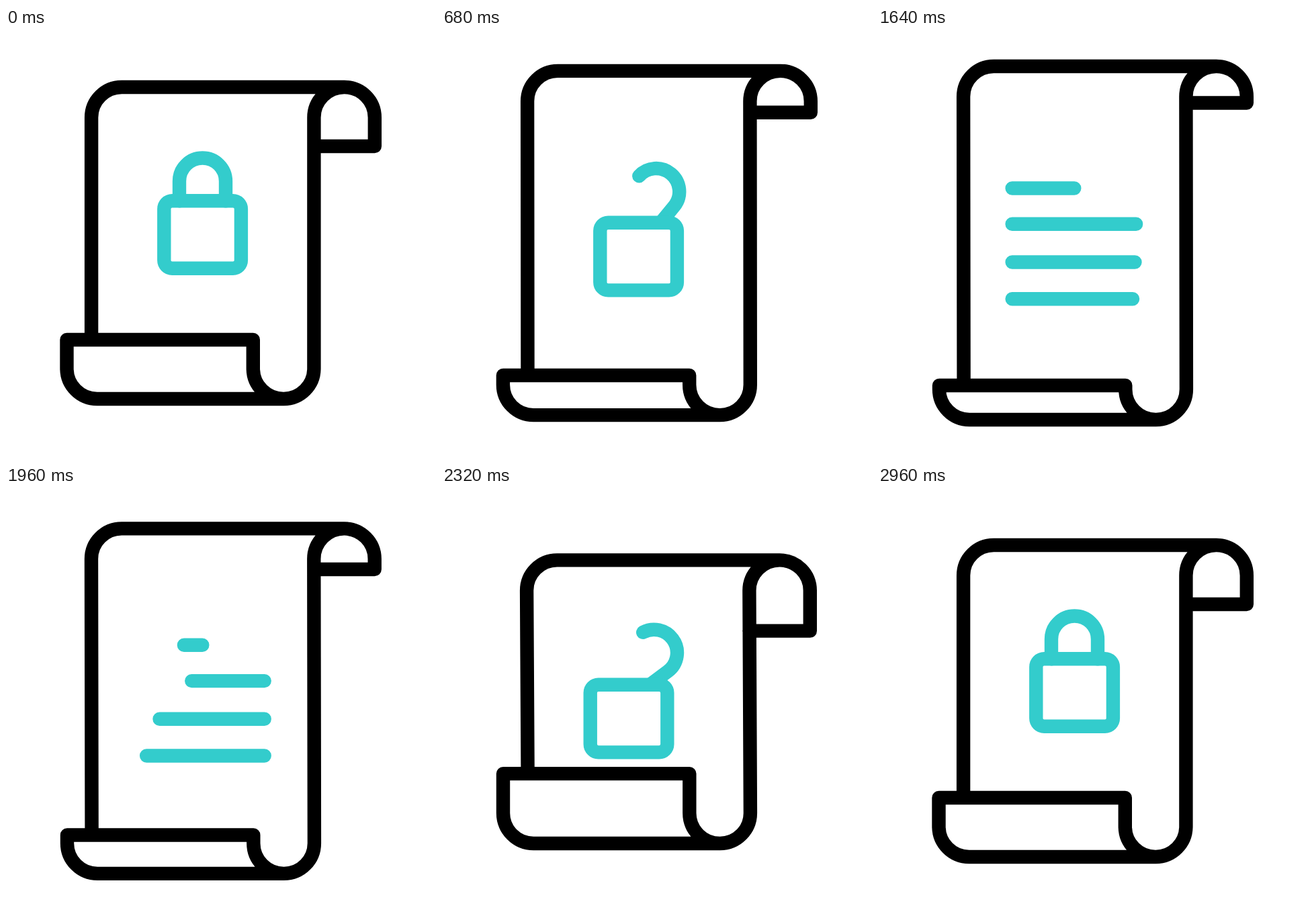
Recreate the animation shown at these times as an HTML page. Size 640 by 640 pixels, loop 3000 ms.

```html
<!DOCTYPE html>
<html lang="en">
<head>
<meta charset="utf-8">
<title>Unlocking scroll</title>
<style>
  html, body { margin: 0; width: 100%; height: 100%; overflow: hidden; background: #fff; }
  svg { display: block; width: 100vw; height: 100vh; }
  path, rect { fill: none; stroke-width: 20.4; stroke-linecap: round; stroke-linejoin: round; }
</style>
</head>
<body>
<svg viewBox="0 0 640 640">
  <defs>
    <clipPath id="paper"><rect x="127" y="0" width="331.5" height="640"/></clipPath>
  </defs>
  <g stroke="#33cccc" clip-path="url(#paper)">
    <g id="lock">
      <path id="shackle" d="M327 257.2V228A34.5 34.5 0 0 0 258 228V257.2"/>
      <rect x="235.3" y="257.2" width="114.6" height="100.6" rx="12"/>
    </g>
    <path id="text"/>
  </g>
  <path id="scroll" stroke="#000"/>
</svg>
<script>
const LOOP = 3000, STEP = 40, R = 45.2;
const SHACKLE = 2 * 29.2 + Math.PI * 34.5;
const SLIDE = 240;
const el = id => document.getElementById(id);
const span = (t, from, to) => Math.max(0, Math.min(1, (t - from) / (to - from)));
const easeOut = p => 1 - (1 - p) ** 3;

// Smooth 0 to 1 between two times
function ramp(t, from, to) {
  const p = span(t, from, to);
  return p * p * (3 - 2 * p);
}

// The sheet unrolls, rolls up past its resting size, then settles
function drawScroll(t) {
  const rollUp = ramp(t, 1840, 2420);
  const open = ramp(t, 200, 890) - rollUp;
  const tight = rollUp - ramp(t, 2420, 2970);

  const top = 88 - 31 * open + 27 * tight;
  const bottom = 552 + 31 * open - 24.3 * tight;
  const flap = top + 88 - 33.5 * open + 21.6 * tight;
  const edge = bottom - 88 + 37 * open - 20.5 * tight;
  const a = -1.1 * tight, b = 0.5 * (open + tight);
  const upper = top + R, lower = bottom - R;
  const arc = (sweep, x, y) => `A${R} ${R} 0 0 ${sweep} ${x} ${y}`;

  el('scroll').setAttribute('d',
    `M${127.1 + b} ${edge}L${127.1 + a} ${upper}` + arc(1, 172.3 + a, top) +
    `H${503.6 + a}` + arc(1, 548.8 + a, upper) + `V${flap}H${458.4 + a}` +
    `M${503.6 + a} ${top}` + arc(0, 458.4 + a, upper) +
    `L${458.4 + b} ${lower}` + arc(1, 413.2 + b, bottom) +
    `H${135.7 + b}` + arc(1, 90.5 + b, lower) + `V${edge}H${367.8 + b}V${lower}` +
    arc(0, 413.2 + b, bottom));
}

// The lock leaves on the right and comes back from the left
function drawLock(t, drop) {
  const x = t < LOOP / 2
    ? SLIDE * ramp(t, 1055, 1455)
    : SLIDE * (ramp(t, 1980, 2380) - 1);
  const angle = 42 * ramp(t, 240, 760) - 28 * ramp(t, 960, 1220)
    + 40 * ramp(t, 1980, 2280) - 54 * ramp(t, 2280, 2900);
  const trim = 35 * (ramp(t, 240, 790) - ramp(t, 2280, 2920));
  el('lock').setAttribute('transform', `translate(${x} ${drop})`);
  el('shackle').setAttribute('transform', `rotate(${angle} 329.5 256.2)`);
  el('shackle').setAttribute('stroke-dasharray', `${SHACKLE - trim + 0.1} 999`);
}

// Rows are drawn from the left, then wiped from the left, one after another
const rowY = [238.5, 291.8, 348.5, 403.2];
const wipeStart = [1704, 1783, 1860, 1905];

function drawText(t, shift) {
  const left = 199.6;
  el('text').setAttribute('d', rowY.map((y, i) => {
    const width = i ? 185.1 : 92.7;
    const drawStart = 1190 + 40 * i;
    const head = easeOut(span(t, drawStart, drawStart + 480));
    const tail = ramp(t, wipeStart[i], wipeStart[i] + 400);
    return head > tail
      ? `M${left + width * tail} ${y + shift}H${left + width * head}` : '';
  }).join(''));
}

function render(ms) {
  const t = Math.floor((ms % LOOP) / STEP) * STEP;
  const sag = 44 * ramp(t, 240, 900);
  const rise = 1.7 * ramp(t, 1840, 1960) + 42.3 * ramp(t, 2190, 2900);
  drawScroll(t);
  drawLock(t, sag - rise);
  drawText(t, -rise);
}

let start;
function tick(now) {
  if (start === undefined) start = now;
  render(Math.max(0, now - start));
  requestAnimationFrame(tick);
}
render(0);
requestAnimationFrame(tick);
</script>
</body>
</html>
```
